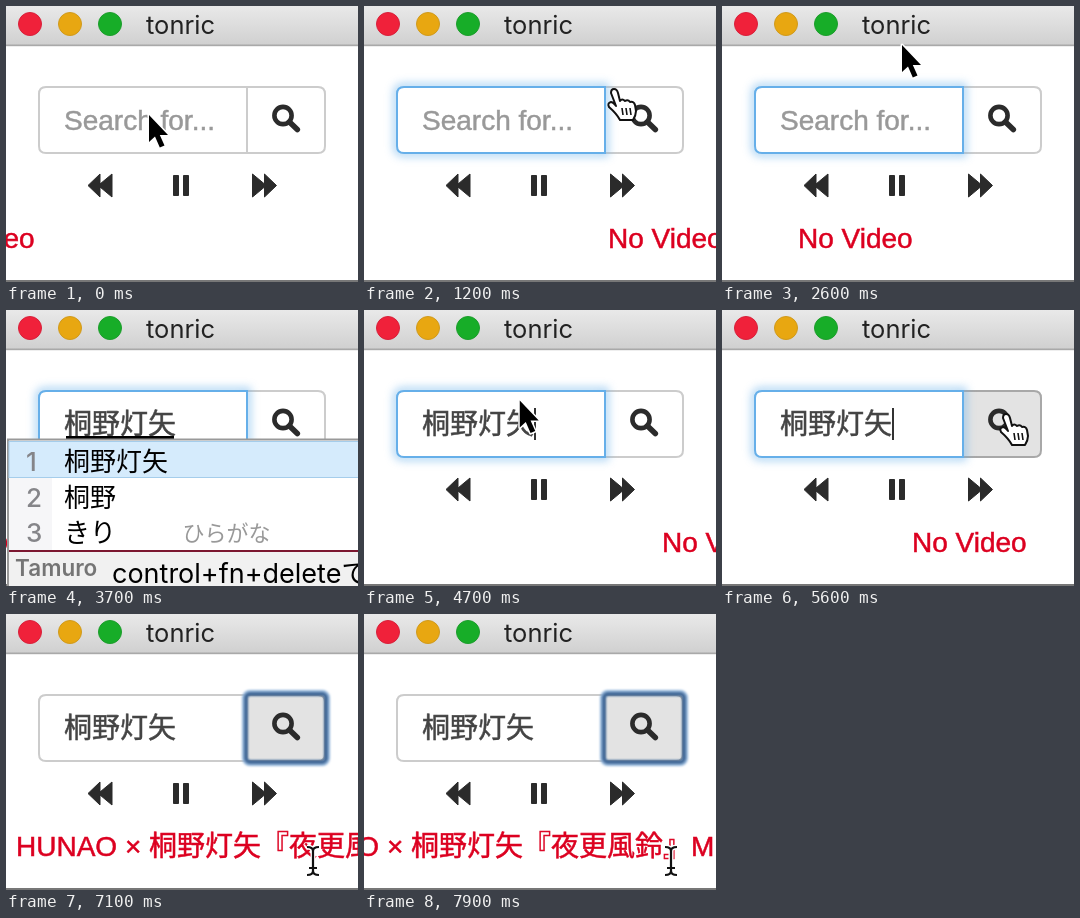
These frames come from a looping animation (352 by 276 pixels, 8000 ms). An HTML page:

```html
<!DOCTYPE html>
<html lang="ja">
<head>
<meta charset="utf-8">
<title>tonric</title>
<style>
html, body { margin: 0; width: 100%; height: 100%; overflow: hidden; background: #fff; }
svg { display: block; width: 100vw; height: 100vh; }
text { font: 28px "Liberation Sans", "Noto Sans CJK JP", sans-serif; white-space: pre; }
#title, #popup text { font-family: Inter, "Noto Sans CJK JP", sans-serif; }
#title { font-size: 25.5px; fill: #222; }
#input, #marquee { stroke-width: .5; }
#popup text { font-size: 26px; }
#popup .num { font-weight: 500; fill: #858589; }
#popup .hint { font-size: 22px; font-weight: 500; fill: #999; }
#popup .brand { font-size: 22.5px; font-weight: 600; fill: #757575; }
#popup .tip { font-size: 27px; }
</style>
</head>
<body>
<svg viewBox="0 0 352 276" preserveAspectRatio="none">
  <defs>
    <linearGradient id="bar" x2="0" y2="1">
      <stop stop-color="#e9e9e9"/><stop offset="1" stop-color="#d0d0d0"/>
    </linearGradient>
    <filter id="blur" x="-20%" y="-40%" width="140%" height="180%"><feGaussianBlur stdDeviation="4"/></filter>
    <filter id="soft" x="-10%" y="-10%" width="120%" height="120%"><feGaussianBlur stdDeviation=".8"/></filter>
    <path id="field" d="M241 81H40Q33 81 33 88V140Q33 147 40 147H241Z"/>
    <path id="rewind" d="M82 179.5L94 168V178L106 168V191L94 181V191Z" stroke-width="1" stroke-linejoin="round"/>
    <path id="stem" d="M-6-14Q0-14 0-10V10Q0 14-6 14M6-14Q0-14 0-10M0 10Q0 14 6 14M-4 7H4"/>
  </defs>
  <rect width="352" height="276" fill="#fff"/>
  <rect width="352" height="39" fill="url(#bar)"/>
  <rect y="38.5" width="352" height="1.7" fill="#a9a9a9"/>
  <g stroke-width="1">
    <circle cx="24" cy="18" r="11.5" fill="#f0213a" stroke="#d8203a"/>
    <circle cx="64" cy="18" r="11.5" fill="#e8a711" stroke="#d09a1c"/>
    <circle cx="104" cy="18" r="11.5" fill="#17ad28" stroke="#1c9d2c"/>
  </g>
  <text id="title" x="140" y="27.5">tonric</text>

  <path id="button" d="M241 81H312Q319 81 319 88V140Q319 147 312 147H241Z" stroke-width="2"/>
  <g fill="none" stroke="#2b2b2b">
    <circle cx="277" cy="109.5" r="8.6" stroke-width="4.6"/>
    <path d="M283.5 116L291.3 123.5" stroke-width="5.6" stroke-linecap="round"/>
  </g>
  <g id="glow">
    <use href="#field" fill="none" stroke="#66afe9" stroke-width="8" filter="url(#blur)" opacity=".5"/>
  </g>
  <use id="box" href="#field" fill="#fff" stroke-width="2"/>
  <g id="ring" fill="none" filter="url(#soft)">
    <rect x="239" y="79" width="82" height="70" rx="5" stroke="#8fb3d9" stroke-width="6"/>
    <rect x="240" y="80" width="80" height="68" rx="4" stroke="#3f6797" stroke-width="4"/>
  </g>
  <text id="input" x="58" y="124"></text>
  <rect id="underline" x="60" y="126" height="3.5"/>
  <rect id="caret" y="98" width="2" height="32" fill="#333"/>

  <g fill="#2b2b2b" stroke="#2b2b2b">
    <use href="#rewind"/>
    <use href="#rewind" transform="matrix(-1 0 0 1 352.5 0)"/>
    <path d="M167.5 169.5h5v20h-5zM177.5 169.5h5v20h-5z" stroke-linejoin="round"/>
  </g>
  <text id="marquee" y="242" fill="#dc0020" stroke="#dc0020"></text>
  <rect y="274" width="352" height="2" fill="#777"/>

  <g id="popup">
    <rect x="2" y="129.5" width="360" height="160" fill="#fff" stroke="#999" stroke-width="2"/>
    <rect x="3" y="131" width="43" height="110" fill="#f6f6f8"/>
    <rect id="pick" x="3" y="131.5" width="360" height="36" fill="#d5ebfc" stroke="#a5cdeb"/>
    <text class="num" x="20" y="161">1</text><text x="58" y="161">桐野灯矢</text>
    <text class="num" x="20" y="197">2</text><text x="58" y="197">桐野</text>
    <text class="num" x="20" y="232">3</text><text x="58" y="232">きり</text>
    <text class="hint" x="176.5" y="231">ひらがな</text>
    <rect x="3" y="242" width="349" height="34" fill="#f1f1f1"/>
    <rect x="3" y="240" width="349" height="2" fill="#7c1730"/>
    <text class="brand" x="9" y="266">Tamuro</text>
    <text class="tip" x="106" y="273">control+fn+deleteで</text>
  </g>

  <g id="cursor" stroke-linejoin="round">
    <path id="arrow" d="M0 0V27L6 21.5L10.8 32.5L15.5 30.5L10.8 20H19Z" stroke="#fff" stroke-width="3" paint-order="stroke"/>
    <g id="hand" fill="#fff" stroke="#111" stroke-width="2">
      <path d="M-3 4Q-3 0 0 0Q3 0 4 4L6 12Q8 9 11 12Q14 10 16 13Q20 12 21 16L22 22Q22 26 19 31H6Q3 25-5 18Q-7 14-3 13Q-1 13 2 17Z"/>
      <path d="M8 19L9 26M12 19L13 26M16 19L17 26" stroke-width="1.6"/>
    </g>
    <g id="beam" fill="none">
      <use href="#stem" stroke="#fff" stroke-width="5"/>
      <use href="#stem" stroke="#111" stroke-width="2.2"/>
    </g>
  </g>
</svg>
<script>
const $ = id => document.getElementById(id);
const show = (id, on) => $(id).style.display = on ? '' : 'none';
const set = (id, attrs) => { for (const k in attrs) $(id).setAttribute(k, attrs[k]); };
const clamp = v => Math.max(0, Math.min(1, v));

const LOOP = 8000, FRAME = 100, NAME = '桐野灯矢';
const FOCUS = 600, TYPE = 2700, SELECT = 3600, COMMIT = 4300, CLICK = 5800, RESULT = 6600;
const SPEED = 0.12, SPAN = 474, LEFT = -115;

// time, value: the latest entry that has begun applies
const typed = [[0, ''], [TYPE, 'k'], [2900, 'き'], [3100, 'きr'], [3300, 'きり'], [SELECT, NAME]];
const shapes = [[0, 'arrow'], [1100, 'hand'], [1400, 'arrow'], [2800, ''], [4700, 'arrow'],
  [5200, 'hand'], [6000, 'arrow'], [6900, 'beam']];
// time, x, y of the pointer's hot spot
const path = [[0, 143, 109], [800, 143, 109], [1200, 250, 83], [1800, 180, 39], [2800, 180, 39],
  [4600, 150, 90], [5400, 284, 104], [5900, 284, 104], [6300, 295, 250], [6600, 308, 31], [7000, 307, 247]];

const latest = (list, t) => list.filter(e => e[0] <= t).pop()[1];

function pointer(t) {
  const i = path.findIndex(p => p[0] > t);
  if (i < 0) return path[path.length - 1].slice(1);
  const [a, b] = [path[i - 1], path[i]];
  const u = (t - a[0]) / (b[0] - a[0]), e = u * u * (3 - 2 * u);
  return [1, 2].map(k => a[k] + (b[k] - a[k]) * e);
}

function draw(t) {
  const value = latest(typed, t), composing = t >= TYPE && t < COMMIT;
  const ink = value ? '#444' : '#999';
  $('input').textContent = value || 'Search for...';
  set('input', { fill: ink, stroke: ink });
  const width = [...value].reduce((w, c) => w + (c < '~' ? 14 : 28), 0);
  show('underline', composing);
  set('underline', { width: Math.max(0, width - 4) });

  const focused = t >= FOCUS && t < CLICK;
  const glow = clamp((t - FOCUS) / 150) * clamp(1 - (t - CLICK) / 150);
  set('glow', { opacity: glow });
  set('box', { stroke: focused ? '#66afe9' : '#ccc' });
  const phase = t % 1000;
  const blink = t < TYPE ? phase >= 650 || phase < 150 : phase >= 350 && phase < 850;
  show('caret', focused && !composing && blink);
  set('caret', { x: 58 + width });

  const hover = t >= 5300;
  set('button', { fill: hover ? '#e3e3e3' : '#fff', stroke: hover ? '#a8a8a8' : '#ccc' });
  show('ring', t >= CLICK);
  show('popup', t >= 2900 && t < COMMIT);
  show('pick', t >= SELECT);

  const x = 244 - SPEED * (t - 1200) - LEFT;
  set('marquee', { x: (x % SPAN + SPAN) % SPAN + LEFT });
  $('marquee').textContent = t < RESULT ? 'No Video' : `HUNAO × ${NAME}『夜更風鈴』MUSIC VIDEO`;

  const shape = latest(shapes, t);
  for (const id of ['arrow', 'hand', 'beam']) show(id, id === shape);
  set('cursor', { transform: `translate(${pointer(t)})` });
}

const start = performance.now();
function tick() {
  const t = (performance.now() - start) % LOOP;
  draw(Math.floor(t / FRAME) * FRAME);
  requestAnimationFrame(tick);
}
tick();
</script>
</body>
</html>
```
